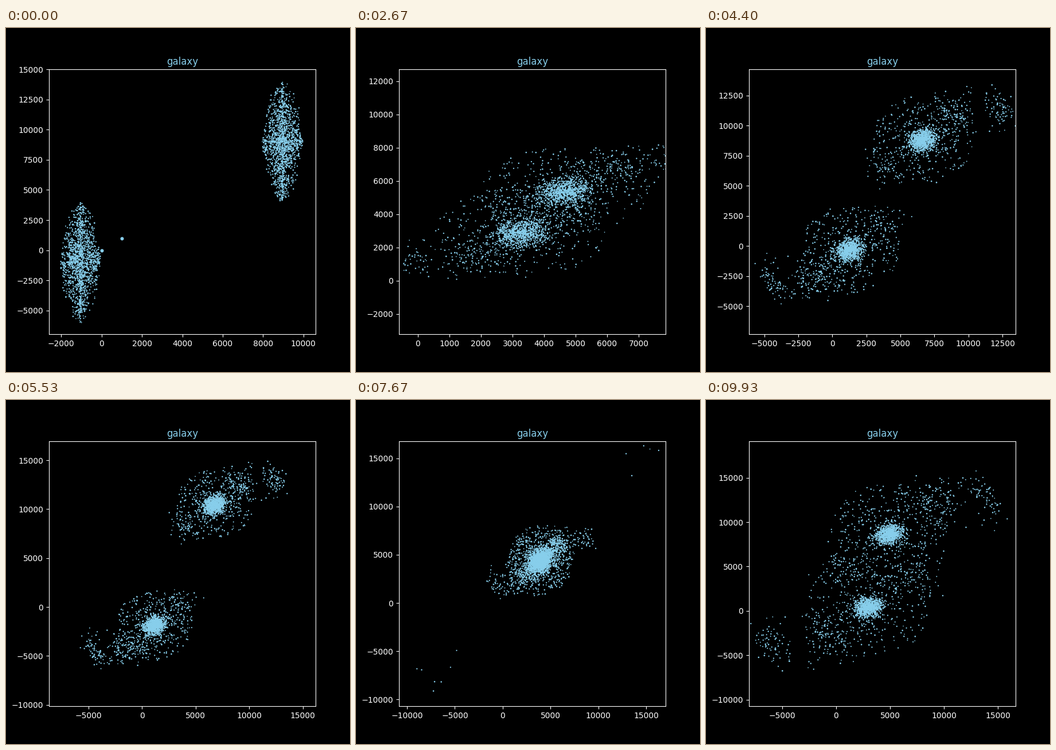
Animation, 600 px wide and 600 px high, one loop 9990 ms. Source, as a matplotlib script:

```python
import numpy as np
import matplotlib.pyplot as plt
from matplotlib.animation import FuncAnimation

FRAMES = 150
LOOP_MS = 9990
CORE, HALO, ARM, TAIL, STRAY = 800, 420, 190, 75, 7
COUNT = CORE + HALO + ARM + TAIL + STRAY
FIRST_PASS, SECOND_PASS, THIRD_PASS = 46, 116, 170
STAR = "skyblue"
rng = np.random.default_rng(11)

VIEW_TIMES = np.array([0, 21, 40, 66, 102, 129, 149])
# left, right, bottom, top of the axes at those times
VIEWS = np.array([
    (-2600, 10600, -6950, 15000),
    (-3727, 11680, -8596, 17360),
    (-600, 7855, -3207, 12724),
    (-6134, 13470, -7333, 14667),
    (-10424, 17758, -11931, 18524),
    (-10468, 16058, -9332, 15374),
    (-8071, 16622, -10710, 19097),
])
VIEW_SLOPES = np.gradient(VIEWS, VIEW_TIMES, axis=0)


def ease(u):
    u = np.clip(u, 0, 1)
    return u * u * (3 - 2 * u)


def view(t):
    """Cubic path through the key views."""
    i = min(np.searchsorted(VIEW_TIMES, t, "right") - 1, len(VIEWS) - 2)
    h = VIEW_TIMES[i + 1] - VIEW_TIMES[i]
    u = (t - VIEW_TIMES[i]) / h
    pull = VIEW_SLOPES[i] * (1 - u) - VIEW_SLOPES[i + 1] * u
    return (VIEWS[i] + (VIEWS[i + 1] - VIEWS[i]) * ease(u)
            + h * u * (1 - u) * pull)


def polar(radius, angle):
    return np.column_stack((radius * np.cos(angle), radius * np.sin(angle)))


def swing(t):
    """Pendulum phase of the pair: 1 at the start, 0 at each pass."""
    t = np.maximum(t, 0)
    return np.select(
        [t < FIRST_PASS, t < SECOND_PASS],
        [np.cos(np.pi / 2 * t / FIRST_PASS),
         -np.sin(np.pi * (t - FIRST_PASS) / (SECOND_PASS - FIRST_PASS))],
        np.sin(np.pi * (t - SECOND_PASS) / (THIRD_PASS - SECOND_PASS)))


def middle(t):
    return np.array([3960, 4000 + 3.5 * t])


def reach(t):
    """Vector from the middle to the second galaxy."""
    size = 7071 if t < FIRST_PASS else 6800 if t < SECOND_PASS else 4460
    angle = np.radians(np.interp(t, [20, 40, 66, 102, 149],
                                 [45, 61, 59.5, 72, 77]))
    return size * swing(t) * np.array([np.cos(angle), np.sin(angle)])


def halo_radius(t):
    return np.interp(t, [40, 66, 129, 149], [2700, 3700, 3300, 5800])


def first_shape():
    """Cross-weighted ellipse; the innermost stars come first."""
    angle = rng.uniform(0, 2 * np.pi, COUNT)
    start = polar(1, angle) * rng.random((COUNT, 2)) * (1000, 5000)
    start = start[np.argsort(np.hypot(*start.T))]
    rng.shuffle(start[CORE:])
    return start


class Galaxy:
    def __init__(self, side):
        self.side = side
        self.start = first_shape()
        outer = COUNT - CORE

        self.radius = 0.45 * rng.rayleigh(size=CORE)
        self.phase = rng.uniform(0, 2 * np.pi, CORE)
        self.speed = rng.normal(0, 0.16, CORE)

        self.kick = rng.normal(size=(outer, 2)) * (50, 95)
        self.kick *= 1.8 * rng.random((outer, 1)) ** 1.5

        self.halo_rank = rng.random(HALO) ** 0.9
        self.halo_angle = rng.uniform(0, 2 * np.pi, HALO)
        self.halo_speed = rng.normal(0, 0.015, HALO)

        arm = polar(0.9, np.full(ARM, np.radians(42)))
        arm *= rng.choice([1, -1], (ARM, 1), p=[0.7, 0.3])
        arm += rng.normal(0, 0.23, (ARM, 2))
        tail = polar(rng.normal(1.7, 0.13, TAIL),
                     np.radians(rng.normal(25, 9, TAIL)))
        self.stream = np.vstack((arm, tail))
        self.lag = rng.uniform(0, 9, (ARM + TAIL, 1))

        self.stray = polar(rng.uniform(0.72, 1.04, STRAY),
                           np.radians(rng.normal(46, 4, STRAY)))

    def core(self, t):
        orbit = polar(self.radius, self.phase + self.speed * t)
        orbit *= (850 + 3.5 * t, 900 + 2 * t)
        orbit[:, 0] += 0.2 * orbit[:, 1]
        rest = np.cos(np.pi / 2 * min(t / 20, 1))
        return rest * self.start[:CORE] + (1 - rest) * orbit

    def early(self, t):
        """Outer stars drift and lean before the first pass."""
        pos = self.start[CORE:] * (1 - 0.006 * t) + self.kick * t
        pos[:, 0] += 0.006 * t * pos[:, 1]
        return pos

    def late(self, t, centre):
        size = halo_radius(t)
        halo = size * polar(self.halo_rank,
                            self.halo_angle + self.halo_speed * t)
        # streams hang on the far side and cross over after each pass
        outward = self.side * np.tanh(4 * swing(t - self.lag))
        stream = size * self.stream * outward
        flight = -self.side * 17500 * np.exp(-((t - 108) / 45) ** 2)
        stray = middle(t) + flight * self.stray - centre
        return np.vstack((halo, stream, stray))

    def stars(self, t):
        centre = middle(t) + self.side * reach(t)
        mix = ease((t - 17) / 21)
        outer = (1 - mix) * self.early(t) + mix * self.late(t, centre)
        return centre + np.vstack((self.core(t), outer))


galaxies = [Galaxy(-1), Galaxy(1)]

plt.style.use("dark_background")
fig, ax = plt.subplots(figsize=(6, 6), dpi=100)
ax.set_title("galaxy", color=STAR)

blank = np.zeros(2 * COUNT)
dots = ax.scatter(blank, blank, s=rng.uniform(1.4, 3.8, 2 * COUNT),
                  c=STAR, linewidths=0)
markers = ax.scatter([0, 1000], [0, 1000], s=19, c=STAR, linewidths=0)


def draw(frame):
    left, right, bottom, top = view(frame)
    ax.set_xlim(left, right)
    ax.set_ylim(bottom, top)
    dots.set_offsets(np.vstack([g.stars(frame) for g in galaxies]))
    markers.set_visible(frame == 0)
    return dots, markers


anim = FuncAnimation(fig, draw, frames=FRAMES, interval=LOOP_MS / FRAMES,
                     repeat=True, repeat_delay=0, blit=False)
plt.show()
```
